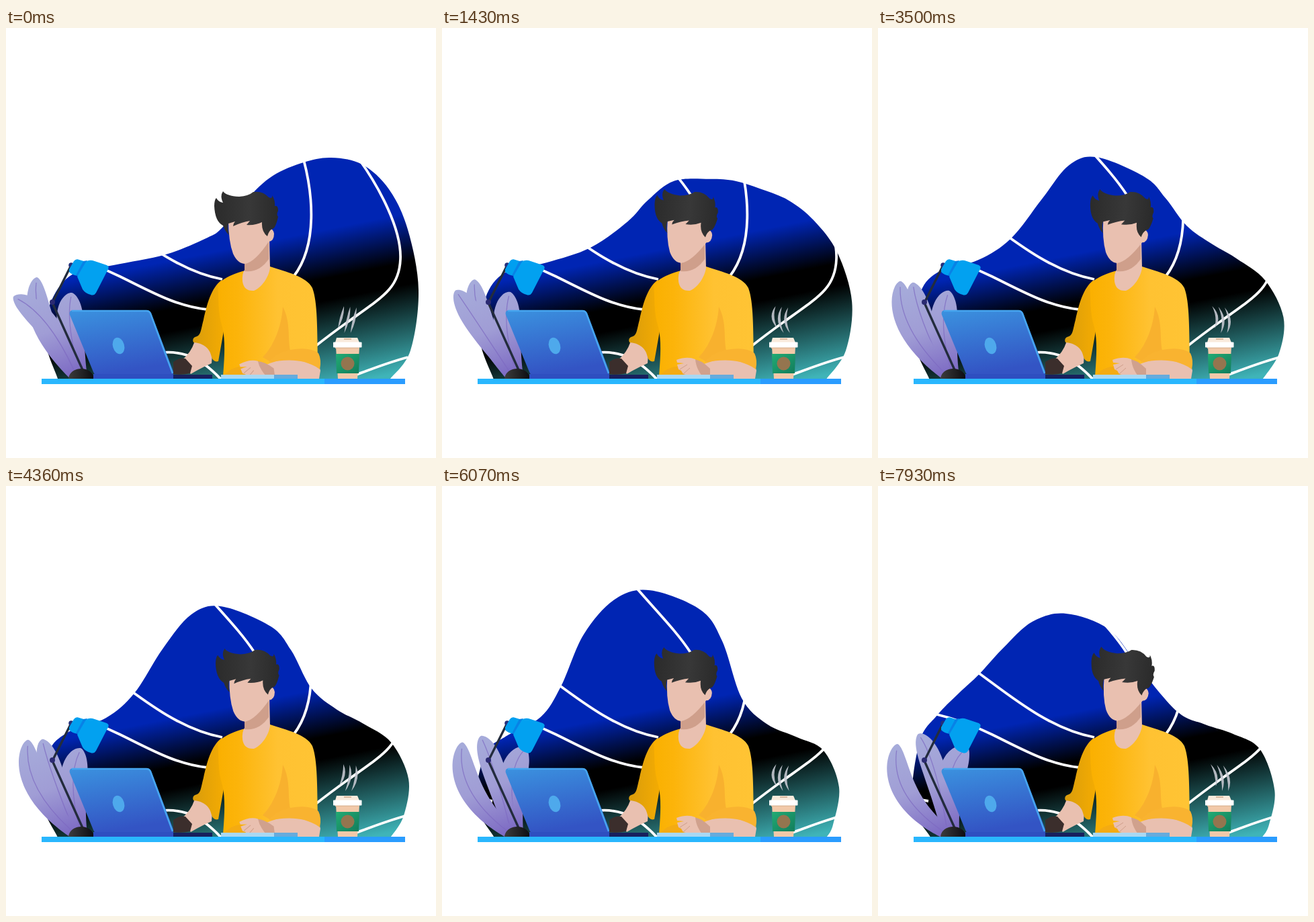
These frames come from a looping animation (640x640 px, 8000 ms). An HTML page:

```html
<!DOCTYPE html>
<html lang="en">
<head>
<meta charset="utf-8">
<title>Working at a desk</title>
<style>
  html, body { margin: 0; width: 100%; height: 100%; overflow: hidden; background: #fff; }
  svg { display: block; width: 100vw; height: 100vh; }
  .lines { fill: none; stroke: #fff; stroke-width: 3.8; }
  .vein { fill: none; stroke: #7d68c0; stroke-width: 1.3; opacity: .7; }
</style>
</head>
<body>
<svg viewBox="0 0 640 640">
  <defs>
    <linearGradient id="night" gradientUnits="userSpaceOnUse" x1="300" y1="335" x2="345" y2="561">
      <stop offset="0" stop-color="#0025b3"/>
      <stop offset=".31" stop-color="#000"/>
      <stop offset=".45" stop-color="#000"/>
      <stop offset="1" stop-color="#3fb4b8"/>
    </linearGradient>
    <linearGradient id="leaf" gradientUnits="userSpaceOnUse" x1="40" y1="385" x2="90" y2="518">
      <stop offset="0" stop-color="#a6abda"/>
      <stop offset=".5" stop-color="#a09dd5"/>
      <stop offset="1" stop-color="#7e6cc4"/>
    </linearGradient>
    <linearGradient id="lid" x1="0" y1="0" x2=".25" y2="1">
      <stop offset="0" stop-color="#3b92df"/>
      <stop offset="1" stop-color="#3354c4"/>
    </linearGradient>
    <linearGradient id="shirt">
      <stop offset="0" stop-color="#fab000"/>
      <stop offset=".2" stop-color="#fcb40a"/>
      <stop offset=".6" stop-color="#ffc232"/>
      <stop offset="1" stop-color="#ffc434"/>
    </linearGradient>
    <linearGradient id="sleeve">
      <stop offset="0" stop-color="#d99c0b"/>
      <stop offset="1" stop-color="#f5ac02"/>
    </linearGradient>
    <linearGradient id="hair">
      <stop offset="0" stop-color="#2b2b2b"/>
      <stop offset=".55" stop-color="#383838"/>
      <stop offset="1" stop-color="#2a2a2a"/>
    </linearGradient>
    <linearGradient id="band" x1="0" y1="0" x2="1" y2="1">
      <stop offset="0" stop-color="#22ab74"/>
      <stop offset="1" stop-color="#127c5b"/>
    </linearGradient>
    <linearGradient id="dome">
      <stop offset="0" stop-color="#3c3c3c"/>
      <stop offset="1" stop-color="#0c0c10"/>
    </linearGradient>
  </defs>

  <path id="blob" fill="url(#night)"/>
  <g class="lines">
    <path d="M288 150C318 185 350 217 370 248S391 294 390 330"/>
    <path d="M443 196C456 245 465 322 428 370"/>
    <path d="M526 196C556 238 589 300 587 344C585 398 548 404 460 474"/>
    <path d="M148 277C195 311 255 362 322 374"/>
    <path d="M80 338C105 344 140 355 170 370C215 392 255 415 300 419"/>
    <path d="M234 483C272 480 298 499 321 524"/>
    <path d="M516 518C543 508 568 498 598 490"/>
    <path d="M50 463Q62 467 75 469"/>
  </g>

  <g id="plant"></g>

  <!-- lamp -->
  <path d="M97 353L69 409L115 511" fill="none" stroke="#232c3d" stroke-width="3.4"/>
  <circle cx="69" cy="408" r="4" fill="#2b2a72"/>
  <circle cx="97" cy="353" r="3.8" fill="#24307c"/>
  <path d="M93 522C95 502 129 502 131 522Z" fill="url(#dome)"/>
  <path d="M94 359L101 347Q104 343 109 345L119 348L108 369Q98 368 94 363Z" fill="#009ff0"/>
  <path d="M104 368L115 347L121 346L110 370Z" fill="#0882e6"/>
  <path d="M106 370L119 348Q124 344 132 347L150 353Q154 355 152 359L134 394Q131 399 126 397Q118 395 114 389Z" fill="#02a1f0"/>

  <!-- laptop -->
  <path d="M101 420H210Q214 420 216 424L249 511Q250 516 246 517H136Q132 517 130 512L95 427Q93 420 101 420Z" fill="url(#lid)"/>
  <path d="M98 421H209Q213 421 215 425L248 514" fill="none" stroke="#46a5ef" stroke-width="2.5"/>
  <path d="M130 515H249V522H130Z" fill="#2e4fc0"/>
  <ellipse cx="167.500" cy="473" rx="8.500" ry="12.500" transform="rotate(-16 167.500 473)" fill="#4ea9ec"/>
  <path d="M249 516H307V522H249Z" fill="#17205e"/>

  <!-- person -->
  <path d="M281 466L308 474L306 499Q290 506 275 515L262 494Q275 484 281 466Z" fill="#e9c0b0"/>
  <path d="M249 497Q258 490 267 492L277 503L274 514Q262 517 249 515Z" fill="#3b2e2c"/>
  <path d="M321 375C305 387 299 412 294 434C290 449 290 457 284 459Q276 461 279 468C291 469 303 474 306 490Q309 498 316 496L326 440Z" fill="url(#sleeve)"/>
  <path d="M352 362Q325 370 315 382C317 405 315 424 322 445C327 467 325 492 323 518H430L464 492C463 450 464 408 456 387C448 370 417 363 393 355Z" fill="url(#shirt)"/>
  <path d="M412 415C410 447 397 475 382 490L397 499L423 480C419 460 424 438 412 415Z" fill="#f8b12e"/>
  <path d="M324 518Q334 505 350 504L372 518Z" fill="#f4ab12"/>
  <path d="M355 345L392 316L393 357C391 371 381 386 369 391Q354 392 352 377Q351 366 355 360Z" fill="#e9c0b0"/>
  <path d="M355 351L391 318V344C382 357 370 364 355 362Z" fill="#cf9f8b"/>

  <path d="M374 508Q402 491 438 492Q466 496 468 510L466 522H388Z" fill="#e9c0b0"/>
  <path d="M391 498Q400 484 423 479Q452 474 465 484Q470 494 467 508C442 490 412 494 391 498Z" fill="#f9b330"/>
  <g id="hand">
    <path d="M372 493Q384 492 399 507V518H374Z" fill="#d0a18d"/>
    <path d="M349 494Q365 488 377 493Q378 506 387 518H370L359 515L356 510L352 508L350 501L360 499L350 498Z" fill="#e9c0b0"/>
    <path d="M354 508L365 501M359 515L369 506" fill="none" stroke="#cf9f8b"/>
  </g>

  <g id="head">
    <path d="M331 286Q331 317 338 336Q345 351 356 351Q371 348 391 318Q399 317 399 306Q397 296 388 300L382 278H333Z" fill="#e9c0b0"/>
    <path d="M313 253Q316 259 323 260Q318 250 323 243Q328 250 347 251Q361 250 368 244Q382 242 391 252Q397 255 396 249Q401 257 400 265Q405 263 405 272Q402 278 405 281Q401 299 396 299Q391 302 389 310Q380 303 381 289Q371 294 358 293Q360 291 363 287Q351 289 338 295Q338 291 341 288L331 291Q329 298 332 308Q326 303 323 294Q311 288 310 265Q310 256 313 253Z" fill="url(#hair)"/>
  </g>

  <path d="M320 516H400V523H320Z" fill="#a9d8f3"/>
  <path d="M399 516H434V523H399Z" fill="#66abdc"/>

  <!-- cup -->
  <path d="M491 475H526L523 522H494Z" fill="#f2c9a9"/>
  <path d="M491 485H526L525 514H492Z" fill="url(#band)"/>
  <circle cx="508.500" cy="499.500" r="10" fill="#94754f"/>
  <path d="M492 461H523L526 468H490Z" fill="#f9eadc"/>
  <path d="M503 462H514V464H503Z" fill="#d8b89d"/>
  <path d="M490 475H526V477H490Z" fill="#dfb897"/>
  <rect x="487" y="467.500" width="42.500" height="8" rx="1" fill="#fff"/>
  <path id="steam" fill="#c9cbd4" opacity=".88"/>

  <path d="M53 522H474V530H53Z" fill="#29b7fe"/>
  <path d="M474 522H594V530H474Z" fill="#2a9cff"/>
</svg>

<script>
const LOOP = 8000, SWAY = 4800;
const BLOB_STEP = 3000, LEAF_STEP = 3600;
const $ = id => document.getElementById(id);
const points = text => text.split(" ").map(p => p.split(",").map(Number));
const clamp01 = v => Math.min(1, Math.max(0, v));

// Outline of the backdrop, one key shape per step.
const blob = [
  "77,522 57,460 68,405 100,366 160,353 238,337 300,312 322,297 360,253 397,220 443,200 484,193 530,203 570,240 598,300 614,390 602,480 572,522",
  "76,522 55,466 61,398 87,362 150,345 202,316 250,262 289,212 329,200 400,230 430,258 462,290 500,315 535,337 578,372 606,427 600,480 573,522",
  "77,522 51,472 64,400 95,374 148,345 178,299 212,220 259,167 311,154 386,183 418,229 446,315 483,354 528,374 568,394 591,448 582,504 573,522",
  "78,522 51,471 61,369 84,323 104,289 136,269 172,253 214,221 263,210 321,231 378,300 446,348 488,355 528,366 569,391 590,456 582,504 572,522"
].map(points);

// Leaves bend along a spine: each key is a tip and a control point.
const leaves = [
  { base: [112, 520], width: 20, keys: ["98,394 88,442", "106,391 88,442", "134,389 94,420"] },
  { base: [104, 520], width: 17, keys: ["46,371 38,438", "52,379 60,432", "60,369 88,412"] },
  { base: [106, 520], width: 18, keys: ["11,400 66,428", "34,376 30,450", "29,384 18,464"] }
].map(leaf => ({ ...leaf, keys: leaf.keys.map(points) }));

const mix = (a, b, k) => a.map((v, i) => v + (b[i] - v) * k);

function poseAt(keys, step, t) {
  const i = Math.min(keys.length - 2, Math.floor(t / step));
  const k = clamp01(t / step - i);
  return keys[i].map((p, n) => mix(p, keys[i + 1][n], k));
}

// Smooth open curve through the points.
function curve(pts) {
  const at = i => pts[Math.min(pts.length - 1, Math.max(0, i))];
  let d = "M" + pts[0];
  for (let i = 0; i < pts.length - 1; i++) {
    const [p, a, b, q] = [at(i - 1), at(i), at(i + 1), at(i + 2)];
    const c1 = a.map((v, n) => v + (b[n] - p[n]) / 6);
    const c2 = b.map((v, n) => v - (q[n] - a[n]) / 6);
    d += `C${c1} ${c2} ${b}`;
  }
  return d;
}

function addPath(attrs) {
  const path = document.createElementNS("http://www.w3.org/2000/svg", "path");
  for (const name in attrs) path.setAttribute(name, attrs[name]);
  return $("plant").appendChild(path);
}
for (const leaf of leaves) {
  leaf.shape = addPath({ fill: "url(#leaf)" });
  leaf.vein = addPath({ class: "vein" });
}

function drawLeaf({ base, width, keys, shape, vein }, t) {
  const [tip, bend] = poseAt(keys, LEAF_STEP, t);
  const left = [], right = [];
  for (let i = 0; i <= 12; i++) {
    const u = (i / 12) ** 1.5;
    const a = mix(tip, bend, u), b = mix(bend, base, u);
    const [x, y] = mix(a, b, u);
    const angle = Math.atan2(b[1] - a[1], b[0] - a[0]);
    const w = width * Math.sin(Math.PI * .85 * u ** .6);
    const dx = Math.sin(angle) * w, dy = Math.cos(angle) * w;
    left.unshift([x - dx, y + dy]);
    right.push([x + dx, y - dy]);
  }
  shape.setAttribute("d", curve([...left, ...right.slice(1)]) + "Z");
  vein.setAttribute("d", `M${mix(tip, bend, .12)}Q${bend} ${base}`);
}

// A wave runs down the wisps: top, middle and bottom follow with a lag.
function drawSteam(t) {
  const wave = lag => Math.cos(2 * Math.PI * (t / SWAY + .23 * lag));
  const top = 498 + 5 * wave(0), mid = 498 + 6 * wave(1), low = 499 + 5 * wave(2);
  $("steam").setAttribute("d", [0, 1, 2].map(i => {
    const shift = 9.3 * i, y0 = 414 + i, y1 = i ? 454 : 447;
    const x0 = top + shift, x1 = low + shift;
    const bend = 2 * (mid + shift) - (x0 + x1) / 2, y = (y0 + y1) / 2;
    return `M${x0} ${y0}Q${bend - 3} ${y} ${x1} ${y1}Q${bend + 5} ${y} ${x0} ${y0}Z`;
  }).join(""));
}

function draw(t) {
  $("blob").setAttribute("d", curve(poseAt(blob, BLOB_STEP, t)) + "Z");
  leaves.forEach(leaf => drawLeaf(leaf, t));
  drawSteam(t);

  const nod = 1 - Math.abs(1 - 2 * (t % SWAY) / SWAY);
  const lift = clamp01((nod - .15) / .35);
  $("head").setAttribute("transform", `rotate(${7.2 * nod} 372 350)`);
  $("hand").setAttribute("transform", `rotate(${8 * (lift - 1)} 395 510)`);
}

function tick() {
  draw(performance.now() % LOOP);
  requestAnimationFrame(tick);
}
tick();
</script>
</body>
</html>
```
